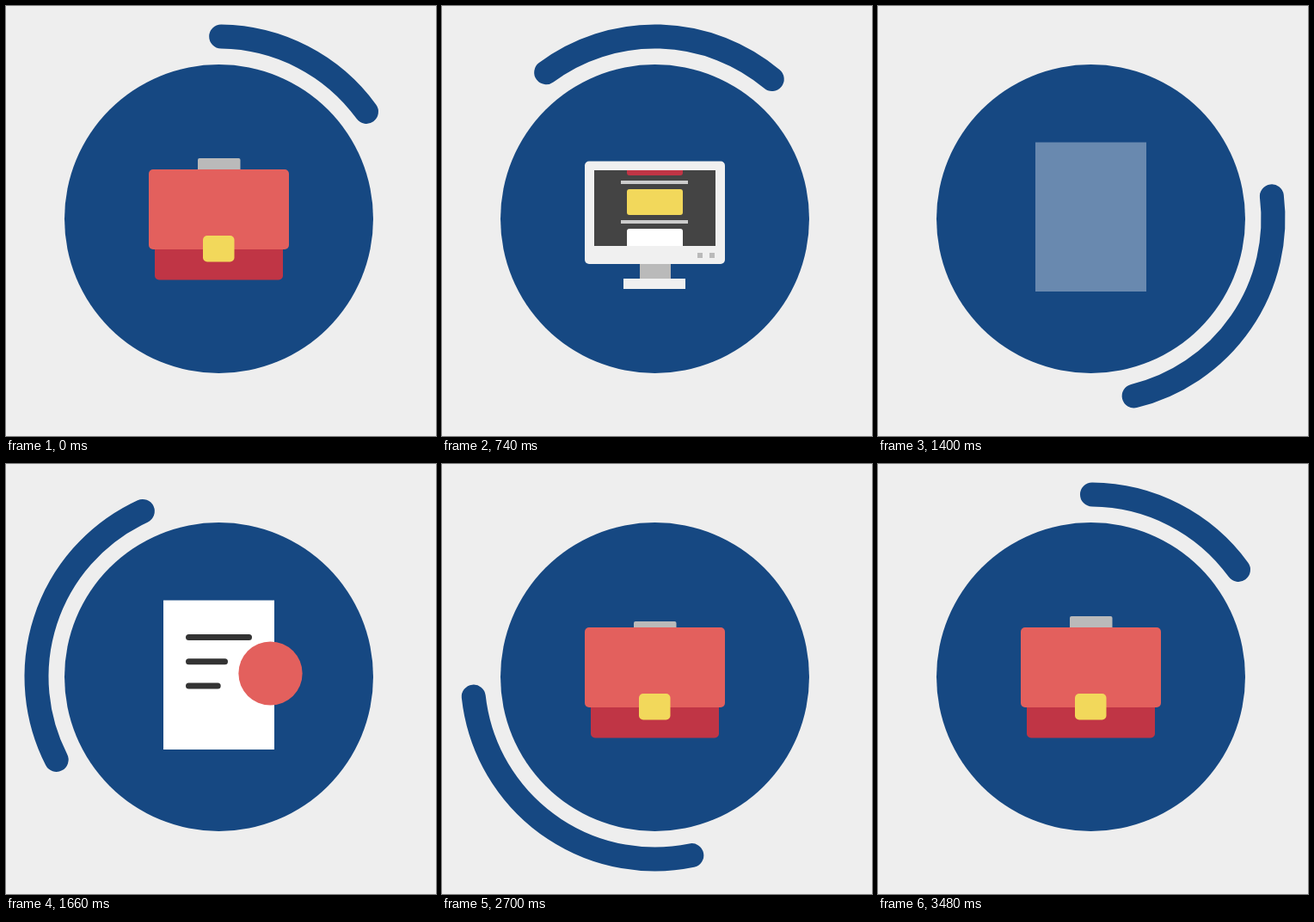
Animation of 500x500 px, one loop 3.5 s. Source, as an HTML page with a canvas:

```html
<!DOCTYPE html>
<html lang="en">
<head>
<meta charset="utf-8">
<title>Icon loader</title>
<style>
  html, body { margin: 0; height: 100%; overflow: hidden; background: #eee; }
  canvas { display: block; width: 500px; height: 500px; }
</style>
</head>
<body>
<canvas width="500" height="500"></canvas>
<script>
const ctx = document.querySelector('canvas').getContext('2d');
const LOOP = 3500;
const STARTS = [23, 1203, 2379];
const BLUE = '#164882', RED = '#e3605d', DARK_RED = '#c03545';
const YELLOW = '#f2d85b', LIGHT = '#f0f0f0', GREY = '#bababa', INK = '#333';

const clamp = v => Math.max(0, Math.min(1, v));
const ramp = (t, from, to) => clamp((t - from) / (to - from));

// cubic-bezier(.25, .1, .25, 1)
function ease(x) {
  x = clamp(x);
  let lo = 0, hi = 1;
  for (let i = 0; i < 24; i++) {
    const s = (lo + hi) / 2;
    if (.75 * s * (1 - s) + s ** 3 < x) lo = s; else hi = s;
  }
  const s = lo, r = 1 - s;
  return .3 * r * r * s + 3 * r * s * s + s ** 3;
}

function box(color, left, top, right, bottom, radius = 0) {
  ctx.fillStyle = color;
  ctx.beginPath();
  ctx.roundRect(left, top, right - left, bottom - top, radius);
  ctx.fill();
}

function disc(color, x, y, r) {
  ctx.fillStyle = color;
  ctx.beginPath();
  ctx.arc(x, y, r, 0, 2 * Math.PI);
  ctx.fill();
}

function briefcase(t) {
  const drop = 14 * (1 - ramp(t, 270, 360));
  box(GREY, 223, 177 + drop, 272.5, 195 + drop, 2);
  box(DARK_RED, 173, 260, 322, 318.5, 5);
  box(RED, 166, 190, 329, 283, 5);
  box(YELLOW, 229, 267, 265.5, 297.5, 5);
}

function monitor(t) {
  box(GREY, 230, 299, 266, 318);
  box(LIGHT, 211, 317, 283, 329);
  box(LIGHT, 166, 180.5, 329, 300, 5);
  box(GREY, 297, 287, 303, 293);
  box(GREY, 311, 287, 317, 293);
  box('#444', 177, 191, 318, 279);

  // cards scroll up through the screen
  ctx.save();
  ctx.beginPath();
  ctx.rect(177, 191, 141, 88);
  ctx.clip();
  const top = 279 - 128 * ease(ramp(t, 320, 1000));
  [DARK_RED, YELLOW, '#fff'].forEach((color, i) => {
    const y = top + 46 * i;
    box(color, 215, y, 280, y + 30, 3);
    if (i < 2) box('#ccc', 208, y + 36, 286, y + 40);
  });
  ctx.restore();
}

function certificate(t) {
  box('#fff', 183, 158.5, 312, 332);
  [77, 49, 48, 56].forEach((width, i) => {
    const begin = 200 + 90 * i, y = 198 + 28.2 * i;
    const w = width * ramp(t, begin, begin + 92);
    if (w > 0) box(INK, 209, y, 209 + w, y + 7, Math.min(3.5, w / 2));
  });

  const ribbon = ease(ramp(t, 540, 760));
  ctx.save();
  ctx.translate(308, 244);
  ctx.scale(1, ribbon);
  ctx.fillStyle = YELLOW;
  ctx.beginPath();
  for (const [x, y] of [[-21, 0], [21, 0], [21, 65], [18, 65], [17, 72], [0, 63], [-17, 72], [-18, 64], [-21, 64]])
    ctx.lineTo(x, y);
  ctx.fill();
  ctx.restore();

  const scale = 1.16 * ramp(t, 330, 445) - .16 * ramp(t, 460, 560);
  disc(RED, 307.5, 243.5, 32 * scale);
  disc(DARK_RED, 307, 243.5, 14 * ease(ramp(t, 520, 680)));
}

const ICONS = [monitor, certificate, briefcase];

function draw(time) {
  const now = time % LOOP;
  const cycle = now < STARTS[0] ? 2 : STARTS.filter(s => s <= now).length - 1;
  const t = (now - STARTS[cycle] + LOOP) % LOOP;

  ctx.globalAlpha = 1;
  box('#eee', 0, 0, 500, 500);
  disc(BLUE, 247.5, 247.5, 179.5);

  const angle = deg => (deg - 90) * Math.PI / 180;
  ctx.strokeStyle = BLUE;
  ctx.lineWidth = 28;
  ctx.lineCap = 'round';
  ctx.beginPath();
  ctx.arc(247.5, 247.5, 212, angle(1 + 360 * ease(t / 1166)), angle(54 + 360 * ease(t / 955)));
  ctx.stroke();

  const fadeOut = 1 - ramp(t, 0, 170), fadeIn = ramp(t, 130, 320);
  if (fadeOut > 0) {
    ctx.globalAlpha = fadeOut;
    ICONS[(cycle + 2) % 3](LOOP);
  }
  if (fadeIn > 0) {
    ctx.globalAlpha = fadeIn;
    ICONS[cycle](t);
  }
}

function tick() {
  draw(performance.now());
  requestAnimationFrame(tick);
}
tick();
</script>
</body>
</html>
```
